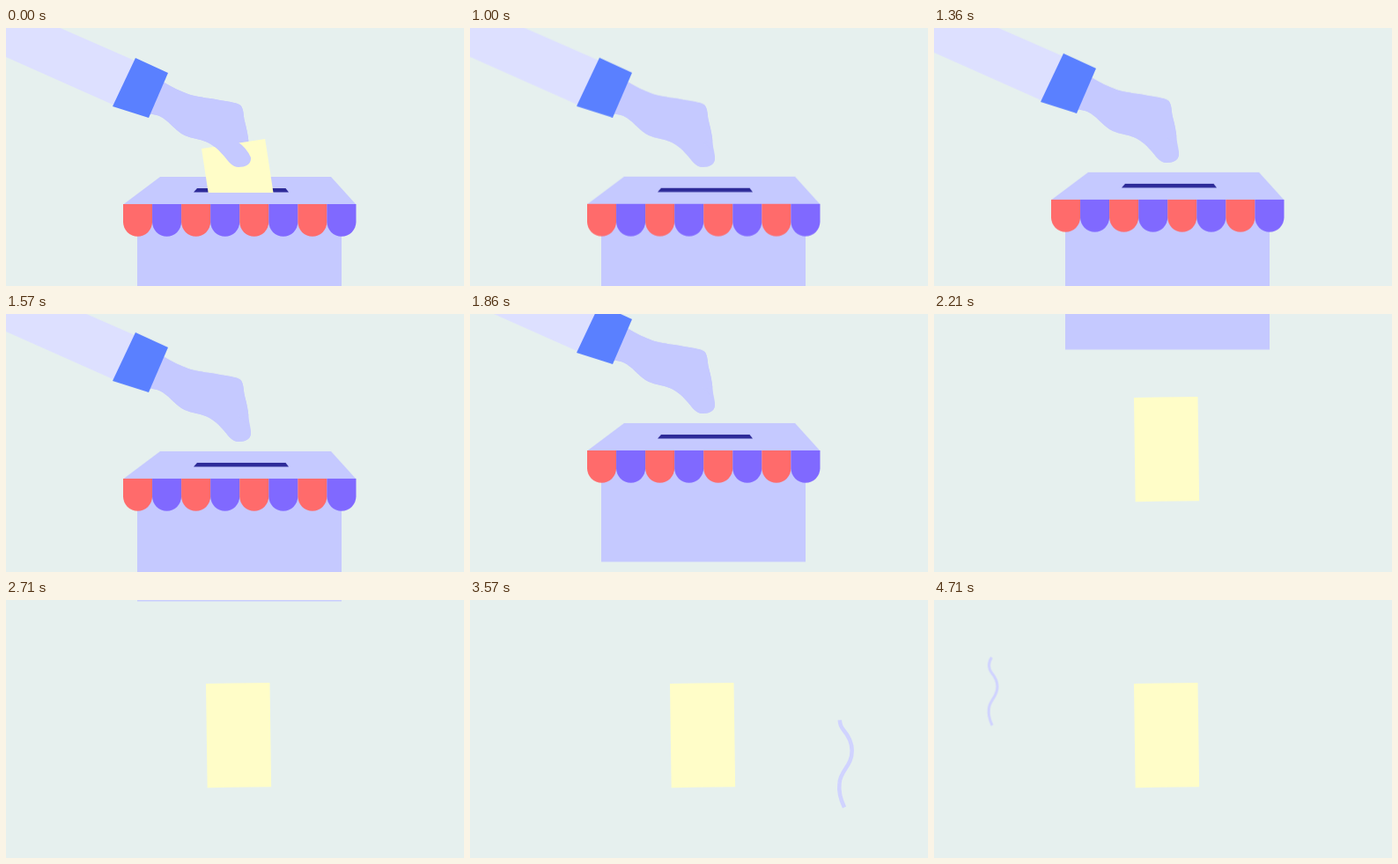
Write an HTML page that moves like this. It is 520 by 293 pixels and loops after 5 s.

```html
<!DOCTYPE html>
<html lang="en">
<head>
<meta charset="utf-8">
<title>Ballot box</title>
<style>
  html, body { margin: 0; width: 100%; height: 100%; overflow: hidden; background: #e6f0ee; }
  svg { display: block; width: 100vw; height: 100vh; }

  .scene, .ballot, .sheet, .squiggle { animation: 5s linear infinite; }
  .scene { animation-name: lift; }
  .ballot { animation-name: drop; }
  .sheet { animation-name: reveal; }
  .squiggle { fill: none; stroke: #d0d3ff; stroke-width: 4.5; stroke-dasharray: 1 2; }
  .right { animation-name: draw-right; }
  .left { animation-name: draw-left; }

  .skin { fill: #c5c9ff; }
  .paper { fill: #fffdc8; }

  /* the camera pans down, so everything rises */
  @keyframes lift {
    0%, 19% { transform: translateY(0); }
    22.8% { transform: translateY(-1px); }
    25.6% { transform: translateY(-3px); }
    28.6% { transform: translateY(-7px); }
    31.4% { transform: translateY(-13px); }
    34.2% { transform: translateY(-23px); }
    35.8% { transform: translateY(-32px); }
    37.2% { transform: translateY(-44.5px); }
    38.6% { transform: translateY(-85px); }
    40% { transform: translateY(-180px); }
    41.4% { transform: translateY(-240px); }
    42.8% { transform: translateY(-270px); }
    44.2% { transform: translateY(-286px); }
    47% { transform: translateY(-304px); }
    50% { transform: translateY(-316px); }
    52.8% { transform: translateY(-323px); }
    55.8%, 100% { transform: translateY(-328px); }
  }
  @keyframes drop {
    0% { transform: translateY(0); animation-timing-function: ease-in-out; }
    7.2%, 100% { transform: translateY(64px); }
  }
  /* appears while the box covers it */
  @keyframes reveal {
    0%, 38.5% { visibility: hidden; }
    38.51%, 100% { visibility: visible; }
  }
  @keyframes draw-right {
    0%, 64.4% { stroke-dashoffset: 1; visibility: hidden; }
    64.41% { stroke-dashoffset: 1; visibility: visible; animation-timing-function: cubic-bezier(.215, .61, .355, 1); }
    78.6% { stroke-dashoffset: 0; visibility: visible; animation-timing-function: ease-in-out; }
    85.6% { stroke-dashoffset: -1; visibility: visible; }
    85.61%, 100% { stroke-dashoffset: -1; visibility: hidden; }
  }
  @keyframes draw-left {
    0%, 82.6% { stroke-dashoffset: 1; visibility: hidden; }
    82.61% { stroke-dashoffset: 1; visibility: visible; animation-timing-function: cubic-bezier(.215, .61, .355, 1); }
    96%, 100% { stroke-dashoffset: 0; visibility: visible; }
  }
</style>
</head>
<body>
<svg viewBox="0 0 520 293" preserveAspectRatio="none">
  <defs>
    <path id="hand" class="skin" d="M178 61C188 67 198 72 208 75.500C220 79 234 80 246 82.500C254 84 263 85 266.500 88C270 92 269.500 100 271 106C273 114 275 122 275.500 130C276 138 278.500 143 278 149C277.500 155 272 158 264 158C257 158 253 152 248 146C243 140 236 133 228 129.500C220 126 211 125.500 203 122C194 118 187 108 178 102C173 99 168 98 160 97Z"/>
    <path id="wave" pathLength="1" d="M425 235.500C420.500 226 418.500 216 419.500 208C420.500 193 433.700 189 433.700 171C433.700 162 429.500 154 424 147.500C419 141.500 417.500 131 424.500 121.500"/>
    <g id="scallops">
      <path id="flap" fill="#ff6b6b" d="M133 200h33.060v20.200a16.530 16.530 0 0 1-33.060 0z"/>
      <path fill="#8069ff" d="M166.060 200h33.060v20.200a16.530 16.530 0 0 1-33.060 0z"/>
    </g>
    <clipPath id="above-slot"><rect width="520" height="187"/></clipPath>
    <clipPath id="thumb-side"><path d="M0 0H300V125L274 128.500L264 130Q273 136 278 147L300 170H0Z"/></clipPath>
  </defs>

  <g class="sheet">
    <rect class="paper" width="72.500" height="118.200" transform="translate(227 95) rotate(-.8)"/>
  </g>

  <g class="scene">
    <rect class="skin" x="149" y="199" width="232" height="127.500"/>
    <path class="skin" d="M175 169H369L397.500 200.500H133Z"/>
    <use href="#scallops"/>
    <use href="#scallops" x="66.120"/>
    <use href="#scallops" x="132.240"/>
    <use href="#scallops" x="198.360"/>
    <path fill="#2d2a98" d="M217 182H317.500L321 186.500H213Z"/>

    <use href="#hand"/>
    <g clip-path="url(#above-slot)">
      <g transform="translate(222 137) rotate(-8.700)">
        <rect class="paper ballot" width="73" height="119"/>
      </g>
    </g>
    <g clip-path="url(#thumb-side)"><use href="#hand"/></g>

    <path fill="#dde0ff" d="M0 -27L146 37L128 90L0 33Z"/>
    <path fill="#5a80ff" d="M147 34L184 51L162 102L121 89Z"/>
  </g>

  <use href="#wave" class="squiggle right"/>
  <g transform="translate(-223 -17.800) scale(.68)">
    <use href="#wave" class="squiggle left"/>
  </g>
</svg>
</body>
</html>
```
